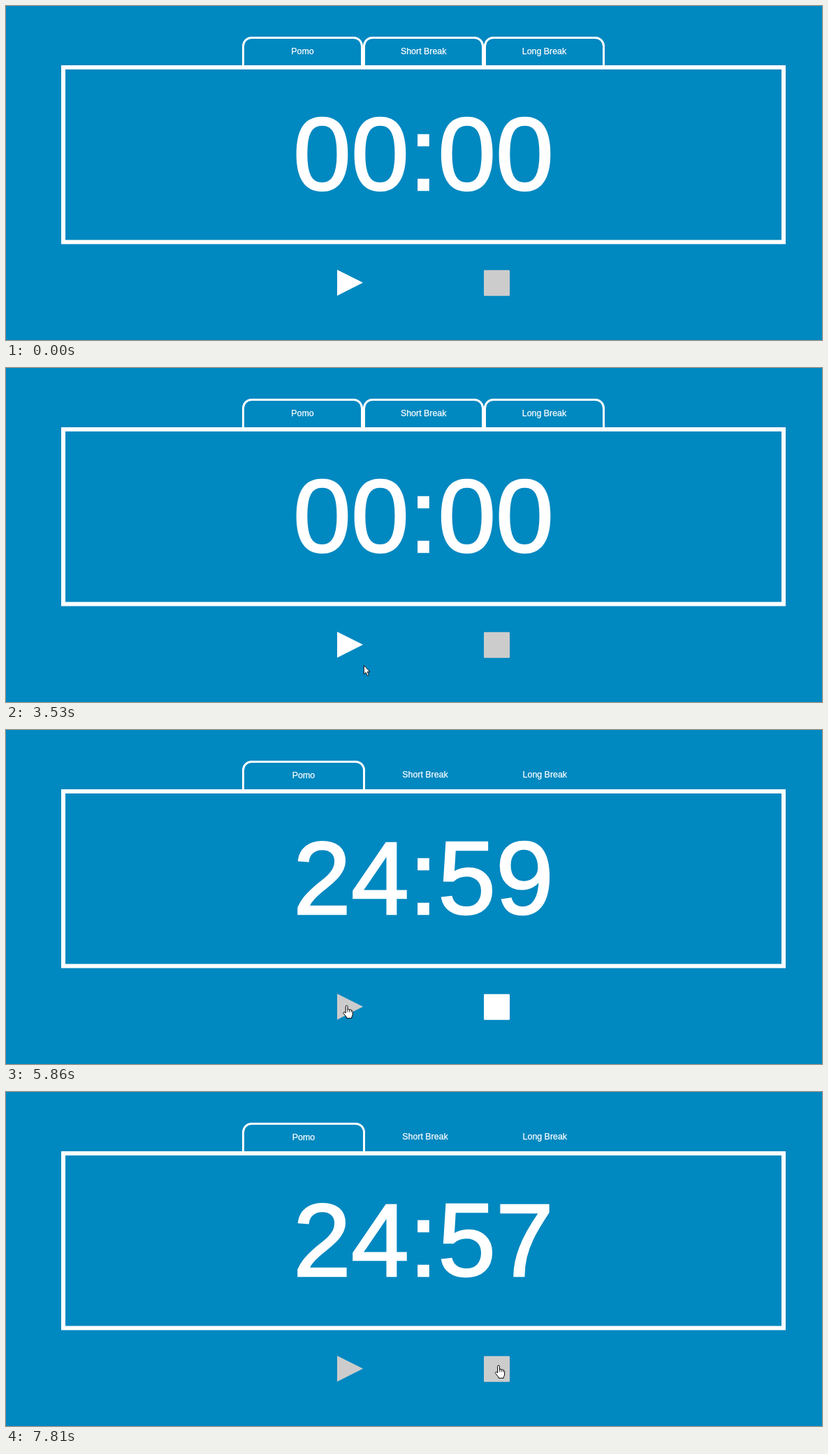
Recreate the animation shown at these times as an HTML page. Size 1168 px wide and 479 px high, loop 8 s.

```html
<!DOCTYPE html>
<html lang="en">
<head>
<meta charset="utf-8">
<title>Pomodoro timer</title>
<style>
  html, body { margin: 0; width: 100%; height: 100%; overflow: hidden; background: #0088c0; }
  svg { display: block; }
  text {
    fill: #fff; stroke: #fff; stroke-width: .25; text-anchor: middle;
    font: 12.4px "Liberation Sans", Arial, sans-serif;
  }
  #clock { font-size: 149px; stroke-width: 2.5; }
  .line { fill: none; stroke: #fff; stroke-width: 3; }
  .cursor { fill: #fff; stroke: #000; stroke-linejoin: round; }
</style>
</head>
<body>
<svg width="1168" height="479" viewBox="0 0 1168 479">
  <rect x="82" y="88" width="1031" height="250.5" class="line" style="stroke-width:6"/>
  <g id="idle">
    <text x="424.5" y="69">Pomo</text>
    <text x="597.7" y="69">Short Break</text>
    <text x="770.5" y="69">Long Break</text>
  </g>
  <g id="running">
    <text x="426" y="69">Pomo</text>
    <text x="600" y="68">Short Break</text>
    <text x="771.3" y="68">Long Break</text>
  </g>
  <text id="clock" x="597.5" y="264">00:00</text>
  <path id="play" d="M474 378.2l37 18.6l-37 18.6Z"/>
  <rect id="stop" x="684" y="378.7" width="37" height="37" rx="1.2"/>
  <path id="arrow" class="cursor" d="M.4 .4V13.2L3.2 10.6L5.3 15.4L7.4 14.5L5.3 9.8H9Z" stroke-width=".9"/>
  <g id="hand" class="cursor">
    <path d="M-1.4 11V1.5a1.4 1.4 0 0 1 2.8 0V6.5a1.3 1.3 0 0 1 2.6 .4a1.3 1.3 0 0 1 2.6 .6a1.2 1.2 0 0 1 2 .9V13q0 2-1.3 3.6V18.3H0V17L-4.4 11.4a1.3 1.3 0 0 1 2-1.6Z"/>
    <path d="M1.4 6.5v3M4 7v2.6M6.6 7.6v2.2" fill="none" stroke-width=".8"/>
  </g>
</svg>
<script>
const LOOP = 8000, APPEAR = 20, START = 4970;
const LAG = 60;     // buttons recolour a little after the cursor
const FLICK = 260;  // usual length of a cursor move
const LEFT = 338, TAB = 173;

const $ = id => document.getElementById(id);
const [idle, running, clock, play, stop, arrow, hand] =
  ['idle', 'running', 'clock', 'play', 'stop', 'arrow', 'hand'].map($);

function addTab(group, x, w) {
  const tab = document.createElementNS('http://www.w3.org/2000/svg', 'path');
  tab.setAttribute('class', 'line');
  tab.setAttribute('d', `M${x + 1.5} 86V57.5a12 12 0 0 1 12-12h${w - 27}a12 12 0 0 1 12 12V86`);
  group.append(tab);
}
for (let i = 0; i < 3; i++) addTab(idle, LEFT + i * TAB, TAB);
addTab(running, LEFT, TAB + 3);

// The cursor hesitates on and off the play button, clicks it, then visits stop.
const onPlay = [502, 402], belowPlay = [512, 426];
const hesitate = [2040, 2520, 3080, 3530, 4140]
  .map((at, i) => ({ at, to: i % 2 ? onPlay : belowPlay }));
const moves = [
  { at: APPEAR, to: [558, 440], time: 730 },
  { at: 1050, to: onPlay, time: 600 },
  ...hesitate,
  { at: 4440, to: [487, 395] },
  { at: 5860, to: [701, 405], time: 570 },
  { at: 6620, to: [642, 416], time: 790 },
  { at: 7480, to: [705, 392] }
];

// Sideways motion leads and the vertical part follows, which bends each path.
const easeOut = p => 1 - (1 - p) ** 1.5;
const smooth = p => p * p * (3 - 2 * p);

function cursorAt(t) {
  let x = 1000, y = 476;
  for (const { at, to, time = FLICK } of moves) {
    const p = Math.max(0, Math.min(1, (t - at) / time));
    x += (to[0] - x) * easeOut(p);
    y += (to[1] - y) * smooth(p);
  }
  return [x, y];
}

const over = (left, [x, y]) => x >= left && x <= left + 37 && y >= 379 && y <= 416;
const overPlay = pos => over(474, pos);
const overStop = pos => over(684, pos);
const show = (el, on) => el.style.display = on ? '' : 'none';
const tint = (el, grey) => el.style.fill = grey ? '#ccc' : '#fff';

function draw(t) {
  const on = t >= START;
  const pos = cursorAt(t), lagged = cursorAt(t - LAG);
  const pointing = overPlay(pos) || overStop(pos);

  show(idle, !on);
  show(running, on);
  clock.textContent = on ? '24:' + (59 - Math.floor((t - START) / 1000)) : '00:00';
  tint(play, on || overPlay(lagged));
  tint(stop, !on || overStop(lagged));

  show(arrow, t >= APPEAR && !pointing);
  show(hand, t >= APPEAR && pointing);
  for (const el of [arrow, hand]) el.setAttribute('transform', `translate(${pos})`);
}

const begin = performance.now();
function tick() {
  draw((performance.now() - begin) % LOOP);
  requestAnimationFrame(tick);
}
tick();
</script>
</body>
</html>
```
